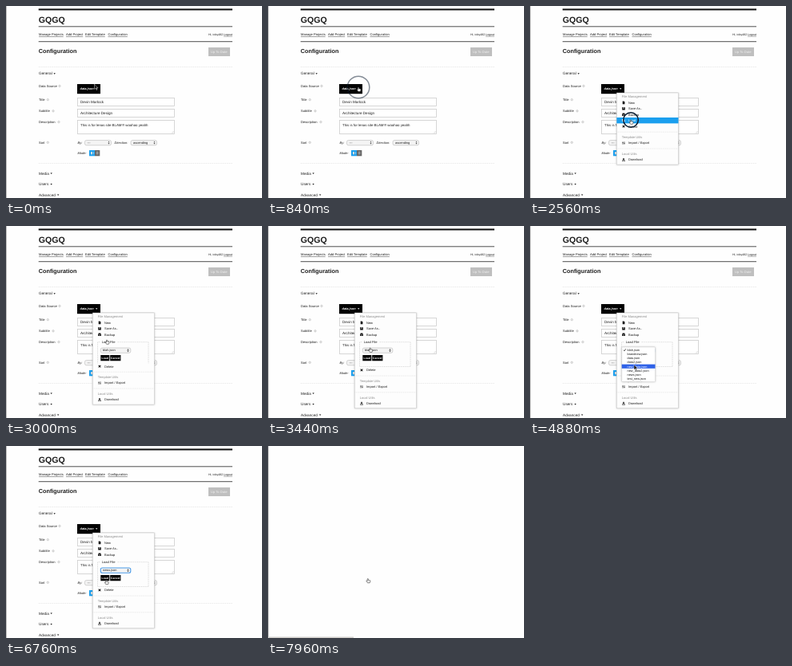
An HTML page that plays this animation: 320x241 px, repeating every 8000 ms.

```html
<!DOCTYPE html>
<html lang="en">
<head>
<meta charset="utf-8">
<title>Configuration</title>
<style>
  html, body { margin: 0; width: 100%; height: 100%; overflow: hidden; background: #fefefe; }
  svg { display: block; width: 100vw; height: 100vh; }
  text { font: 4.1px "Liberation Sans", Arial, sans-serif; fill: #1c1c1c; text-rendering: geometricPrecision; white-space: pre; }
  .bold { font-weight: bold; }
  .italic { font-style: italic; }
  .link { text-decoration: underline; text-decoration-thickness: .4px; }
  .gray { fill: #8a8a8a; }
  .white, .hot text { fill: #fff; }
  .faint { fill: #f0f0f0; }
  .hot .icon { fill: #fff; }
  .icon { fill: #111; }
  .field { fill: #fff; stroke: #ccc; stroke-width: .8; }
  .select { fill: #f4f4f4; stroke: #b8b8b8; stroke-width: .6; }
  .focus { stroke: #4b9be8; stroke-width: 1.1; }
  .dots { stroke: #ccc; stroke-width: .5; stroke-dasharray: .8 .8; }
  .shadow { filter: drop-shadow(0 .8px 1px rgba(0, 0, 0, .25)); }
</style>
</head>
<body>
<svg viewBox="0 0 320 241" preserveAspectRatio="none">
  <defs>
    <clipPath id="menuClip"><rect id="menuWindow" x="100" y="108" width="95" height="0"/></clipPath>
    <clipPath id="panelClip"><rect id="panelWindow" x="108" y="140" width="78" height="0"/></clipPath>
  </defs>

  <g id="page">
    <rect x="40.7" y="3.4" width="242.3" height="2" fill="#111"/>
    <path d="M40.7 25.8h242.3M40.7 44.7h242.3" stroke="#222" stroke-width=".8"/>
    <rect x="253" y="52" width="27" height="11" fill="#bfbfbf"/>
    <path class="dots" d="M40.7 76.5h242.3M40.7 197.5h242.3"/>
    <g id="form">
      <rect class="field" x="89.5" y="115.5" width="121" height="10"/>
      <rect class="field" x="89.5" y="129.5" width="121" height="10"/>
      <rect class="field" x="89.5" y="143.5" width="121" height="17"/>
      <path d="M207 159.6l2.5-2.5M208.4 159.6l1.1-1.1" stroke="#aaa" stroke-width=".4"/>
      <rect class="select" x="98.5" y="168.6" width="33" height="6.2" rx="2"/>
      <rect class="select" x="156" y="168.6" width="32.5" height="6.2" rx="2"/>
      <rect x="104" y="181" width="7" height="7.3" fill="#1b9fee"/>
      <rect x="111" y="181" width="6.3" height="7.3" fill="#666"/>
      <path d="M106 183h2v3.2h-2zM109 183h.6v3.2h-.6zM112.8 183.2h2.7v.8h-2.7zM112.8 185.2h2.7v.8h-2.7z" fill="#ddd"/>
    </g>
    <rect x="89" y="98" width="29" height="12.2"/>
    <path d="M112 103.2h2.4l-1.2 1.5z" fill="#fff"/>

    <g id="menu" clip-path="url(#menuClip)">
      <rect id="menuBox" class="shadow" x="108.3" y="109" width="77.2" height="90" fill="#fdfdfd" stroke="#c4c4c4" stroke-width=".5"/>
      <rect id="hover" x="108.3" width="77.2" height="7.4" fill="#1b9fee"/>
      <g id="head"></g>
      <g id="tail"><path class="dots" d="M108.3 158.2h77.2M108.3 179h77.2"/></g>
      <g id="panel" clip-path="url(#panelClip)">
        <rect x="114.5" y="145.7" width="63.5" height="30.8" fill="none" stroke="#b8b8b8" stroke-width=".5" stroke-dasharray=".9 .7"/>
        <rect x="118" y="143" width="21" height="5" fill="#fdfdfd"/>
        <rect id="select" class="select" x="118.3" y="153" width="37.5" height="6.3" rx="2"/>
        <path d="M151.3 155.8l1.2-1.6 1.2 1.6zM151.3 156.6l1.2 1.6 1.2-1.6z" fill="#444"/>
        <path d="M118.3 162h11v7.3h-11zM130.2 162h13.2v7.3h-13.2z"/>
      </g>
    </g>
    <g id="list">
      <rect class="shadow" x="114.7" y="152" width="41.8" height="43.6" rx="1" fill="#fff" stroke="#c4c4c4" stroke-width=".4"/>
      <rect id="pick" x="114.7" width="41.8" height="5.15" fill="#2f62e8"/>
    </g>
  </g>

  <rect width=".9" height="241" fill="#b5b5b5"/>
  <path id="status" d="M0 239.6h107v1.4H0z" fill="#d2cfcc"/>
  <circle id="ring" fill="none" stroke="#0b1c30" stroke-width="1.5"/>
  <g id="cursor" stroke-linejoin="round">
    <path id="hand" transform="scale(.75)" fill="#fff" stroke="#333" stroke-width=".8" d="M0 0q-.8 0-.8.9v3l-.8-.6q-.8-.2-.8.6L-.5 7h3.7l.8-2.4V3.2q-.4-.6-1-.2q-.5-.6-1.1-.2q-.5-.4-1.1 0V.9Q.8 0 0 0z"/>
    <path id="arrow" fill="#111" stroke="#fff" stroke-width=".4" d="M0 0v6.3l1.5-1.4 1.1 2.4 1-.5-1.1-2.3h2z"/>
  </g>
</svg>

<script>
const LOOP = 8000, STEP = 40, ROW = 7.45, ITEM = 5.15, FIRST_ITEM = 155.6, GROWTH = 29.8;
const $ = id => document.getElementById(id);

function add(parent, tag, attrs) {
  const node = document.createElementNS("http://www.w3.org/2000/svg", tag);
  for (const key in attrs) node.setAttribute(key, attrs[key]);
  return parent.appendChild(node);
}
// y is the optical middle of the line
function label(parent, x, y, words, size = 4.1, cls = "") {
  const node = add(parent, "text", { x, y: y + size * .35, class: cls });
  node.style.fontSize = size + "px";
  node.textContent = words;
  return node;
}

const page = $("page"), form = $("form"), head = $("head"), tail = $("tail"), panel = $("panel"), list = $("list");

label(page, 40.8, 17, "GQGQ", 10.6, "bold");
label(page, 40.8, 56, "Configuration", 7.25, "bold");
[[41, "Manage Projects"], [75, "Add Project"], [99, "Edit Template"], [127.5, "Configuration"]]
  .forEach(([x, words]) => label(page, x, 35.6, words, 4.1, "link"));
label(page, 253, 35.6, "Hi, toby482", 3.6);
label(page, 272, 35.6, "Logout", 3.6, "link");
label(page, 256, 57.4, "Up To Date", 4.1, "faint");

[["General", 84.8, 59.5], ["Media", 210, 55.5], ["Users", 223.5, 55.5], ["Advanced", 237, 64]].forEach(([words, y, x]) => {
  label(page, 41, y, words, 4.7);
  add(page, "path", { d: `M${x} ${y - .5}h2.3l-1.15 1.4z` });
});
[["Data Source", 100.4, 67], ["Title", 117.6, 52.3], ["Subtitle", 131.8, 59], ["Description", 145.6, 66], ["Sort", 171.3, 52.3]]
  .forEach(([words, y, x]) => {
    label(page, 41, y, words, 4.1);
    add(page, "circle", { cx: x, cy: y, r: 1.2, fill: "#eee", stroke: "#aaa", "stroke-width": .5 });
  });
label(form, 93, 120.4, "Devin Marlock", 4.6);
label(form, 93, 134.6, "Architecture Design", 4.6);
label(form, 93, 149, "This is for lenas site BLAM!!! woohoo yeahh", 4.35);
label(form, 89.5, 171.5, "By:", 4, "italic");
label(form, 101.5, 171.5, "---", 4);
label(form, 135.5, 171.5, "Direction:", 4, "italic");
label(form, 159, 171.5, "ascending", 4);
label(form, 89.5, 184.8, "Mode:", 4, "italic");
[127.5, 184.5].forEach(x => add(form, "path", { d: `M${x} 171.2l1-1.4 1 1.4zm0 .8l1 1.4 1-1.4z`, fill: "#444" }));
page.insertBefore(label(page, 92.5, 103.7, "data.json", 3.9, "bold italic white"), $("menu"));

// Menu rows, with icons drawn around their own centre
const icons = {
  New: "M-1.3-1.9H.4L1.4-.9V1.9H-1.3z",
  "Save As..": "M-1.8-1.7H1.3L1.8-1.2V1.7H-1.8zM-.9-1.2V-.2H.7V-1.2z",
  Backup: "M-1.3-1.8H1.3L1.9.3V1.8H-1.9V.3zM-.8.4V1H.8V.4z",
  Load: "M-2-1.6H-.5L0-1H1.5V-.4H-1L-2 1.2zM-.8 0H2.2L1.2 1.7H-1.8z",
  Delete: "M-1.7-1L-1-1.7 0-.7 1-1.7 1.7-1 .7 0 1.7 1 1 1.7 0 .7-1 1.7-1.7 1-.7 0z",
  "Import / Export": "M-1.9-.6L-1-1.8-.1-.6H-.7V1.8H-1.3V-.6zM.1.6L1 1.8 1.9.6H1.3V-1.8H.7V.6z",
  Download: "M-.6-1.9H.6V-.4H1.5L0 1-1.5-.4H-.6zM-2 .8H-1.3V1.3H1.3V.8H2V1.9H-2z"
};
function menuRow(parent, words, y) {
  const node = add(parent, "g", {});
  add(node, "path", { class: "icon", d: icons[words], "fill-rule": "evenodd", transform: `translate(117 ${y})` });
  label(node, 123, y, words, 4);
  return { node, y, moves: parent === tail };
}
label(head, 114.8, 114, "File Management", 4.05, "gray");
label(tail, 114.8, 164.7, "Template Utils", 4.05, "gray");
label(tail, 114.8, 185.6, "Local Utils", 4.05, "gray");
const rows = ["New", "Save As..", "Backup", "Load"].map((words, i) => menuRow(head, words, 121.3 + i * ROW));
const loadRow = rows[3];
rows.push(menuRow(tail, "Delete", 151.1), menuRow(tail, "Import / Export", 172), menuRow(tail, "Download", 192.9));

label(panel, 119.8, 145.4, "Load File", 4.05);
const chosen = label(panel, 121, 156.1, "blah.json", 3.9);
label(panel, 119.5, 165.6, "Load", 3.5, "bold white");
label(panel, 131.1, 165.6, "Cancel", 3.5, "bold white");

const files = ["blah", "brandnew", "data", "data2", "new_data", "new_data2", "news", "test_new"]
  .map((name, i) => label(list, 121.5, FIRST_ITEM + i * ITEM, name + ".json", 3.86));
const tick = add(list, "path", { d: "M117 155.7l1 1.2 1.6-2.6", fill: "none", "stroke-width": .7 });

const track = [
  [160, 110.5, 98.2], [480, 122, 97], [760, 113, 102], [1440, 113, 102], [1640, 116, 117.5],
  [2240, 125.5, 142.4], [2280, 126, 143], [3000, 126, 143], [3360, 127.5, 152.9],
  [3760, 128.3, 153.8], [4360, 128.3, 153.8], [4880, 130, 174.3], [5160, 130, 180],
  [5440, 130, 185.4], [6360, 130, 185.4], [6760, 125.2, 168.4], [7080, 124.8, 166.5]
];
const clicks = [[760, 0], [2560, 120], [3920, 0], [5760, 0], [7280, 0]]; // start, hold

const span = (t, from, to) => Math.min(1, Math.max(0, (t - from) / (to - from)));
const easeOut = p => 1 - (1 - p) ** 2;
const show = (node, on) => node.style.display = on ? "" : "none";
const listActive = t => t >= 4000 && t < 5960;

function cursorAt(t) {
  const next = track.findIndex(key => key[0] > t);
  if (next === 0) return track[0].slice(1);
  if (next < 0) return track[track.length - 1].slice(1);
  const [t0, x0, y0] = track[next - 1], [t1, x1, y1] = track[next];
  const p = span(t, t0, t1);
  return [x0 + (x1 - x0) * p, y0 + (y1 - y0) * p];
}

function drawMenu(t, y) {
  const opened = easeOut(span(t, 960, 1240));
  const unfold = easeOut(span(t, 2760, 3160));
  const shift = GROWTH * unfold;
  show($("menu"), t >= 1000);
  $("menuWindow").setAttribute("height", opened * 95 + shift);
  $("menuBox").setAttribute("height", 90 + shift);
  tail.setAttribute("transform", `translate(0 ${shift})`);
  $("panelWindow").setAttribute("height", unfold ? ROW + shift : 0);
  show(loadRow.node, !unfold);

  const place = row => row.y + (row.moves ? shift : 0);
  const hot = listActive(t) ? null : rows.find(row =>
    Math.abs(y - place(row)) < ROW / 2 && !(row === loadRow && unfold));
  rows.forEach(row => row.node.classList.toggle("hot", row === hot));
  show($("hover"), hot);
  if (hot) $("hover").setAttribute("y", place(hot) - 3.7);

  $("select").classList.toggle("focus", t >= 3920);
  chosen.textContent = t < 5760 ? "blah.json" : "news.json";
}

function drawList(t, y) {
  show(list, t >= 4000 && t < 6160);
  list.style.opacity = 1 - span(t, 5880, 6160);
  const index = Math.max(0, Math.min(7, Math.round((y - FIRST_ITEM) / ITEM)));
  const lit = t < 5800 || t >= 5840;
  show($("pick"), lit);
  $("pick").setAttribute("y", FIRST_ITEM + (index - .5) * ITEM);
  files.forEach((node, i) => node.classList.toggle("white", lit && i === index));
  tick.setAttribute("stroke", lit && index === 0 ? "#fff" : "#111");
}

function drawPointer(t, x, y) {
  $("cursor").setAttribute("transform", `translate(${x} ${y})`);
  const plain = t < 760 || listActive(t);
  show($("hand"), !plain);
  show($("arrow"), plain);

  const click = clicks.find(([start, hold]) => t >= start && t < start + hold + 160);
  const ring = $("ring");
  show(ring, click);
  if (!click) return;
  const p = span(t, click[0] + click[1], click[0] + click[1] + 160);
  ring.setAttribute("cx", x);
  ring.setAttribute("cy", y);
  ring.setAttribute("r", 9.3 + 9 * p);
  ring.style.opacity = 1 - p;
}

function render() {
  const t = Math.floor(performance.now() % LOOP / STEP) * STEP;
  const [x, y] = cursorAt(t);
  show(page, t < 7960);
  show($("status"), t >= 7400);
  drawMenu(t, y);
  drawList(t, y);
  drawPointer(t, x, y);
  requestAnimationFrame(render);
}
render();
</script>
</body>
</html>
```
